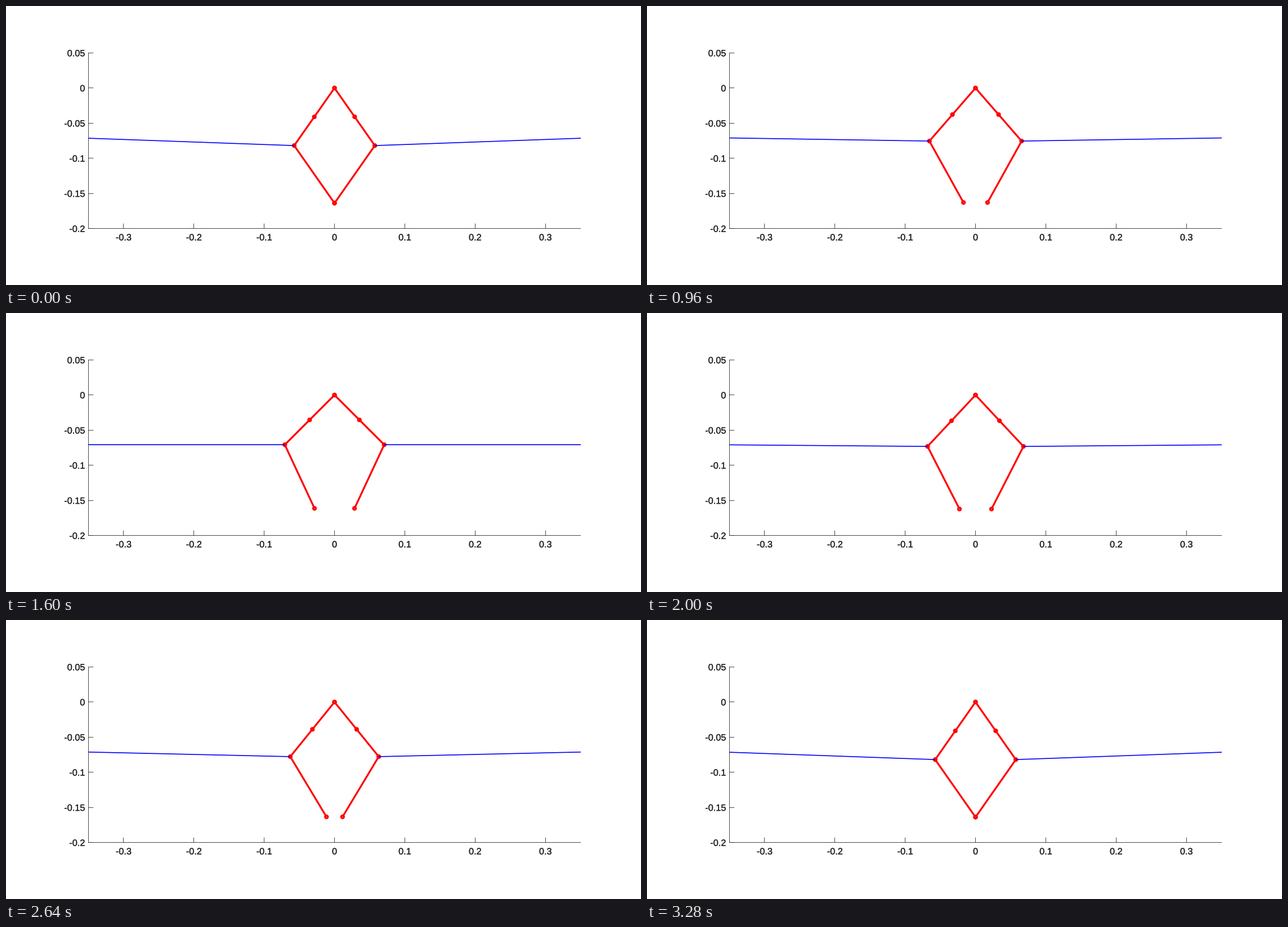
Animation of 1128 by 496 pixels, one loop 3360 ms. Source, as a matplotlib script:

```python
import numpy as np
import matplotlib.pyplot as plt
from matplotlib.animation import FuncAnimation
from matplotlib.lines import Line2D
from matplotlib.patches import Circle
from matplotlib.patheffects import withStroke

WIDTH, HEIGHT, DPI = 1128, 496, 100
PX = 72 / DPI                      # points per pixel
SCALE = 0.775 * WIDTH / 0.7        # pixels per data unit, both axes
ZERO_X, ZERO_Y = 583.55, 145.85    # stage position of the data origin
X_MIN, X_MAX, Y_MIN, Y_MAX = -0.35, 0.35, -0.2, 0.05
TICK = 8.74
INK = "#262626"

LINK = 0.1                         # length of every linkage bar
STEPS = 20
ANGLES = np.radians(np.linspace(35, 45, STEPS + 1))
ANCHOR_X = LINK * np.sin(np.pi / 4) + 0.3
ANCHOR_Y = -LINK * np.cos(np.pi / 4)

plt.rcParams.update({"font.family": "Liberation Sans", "text.hinting": "none",
                     "toolbar": "None"})


def stage_x(x):
    return ZERO_X + x * SCALE


def stage_y(y):
    return ZERO_Y - y * SCALE


fig = plt.figure(figsize=(WIDTH / DPI, HEIGHT / DPI), dpi=DPI, facecolor="white")
ax = fig.add_axes([stage_x(X_MIN) / WIDTH, 1 - stage_y(Y_MIN) / HEIGHT,
                   (X_MAX - X_MIN) * SCALE / WIDTH, (Y_MAX - Y_MIN) * SCALE / HEIGHT])
ax.set(xlim=(X_MIN, X_MAX), ylim=(Y_MIN, Y_MAX))
ax.axis("off")


def rule(x0, y0, x1, y1):
    """Thin axis line between two stage points."""
    fig.add_artist(Line2D([x0 / WIDTH, x1 / WIDTH], [1 - y0 / HEIGHT, 1 - y1 / HEIGHT],
                          transform=fig.transFigure, color=INK, lw=0.85 * PX,
                          solid_capstyle="butt", snap=False))


def label(value, x, baseline, ha):
    fig.text(x / WIDTH, 1 - baseline / HEIGHT, f"{value:g}", ha=ha, va="baseline",
             fontsize=16.3 * PX, color=INK,
             path_effects=[withStroke(linewidth=0.3 * PX, foreground=INK)])


def crisp(position):
    return np.floor(position) + 0.5


left, bottom = crisp(stage_x(X_MIN)), crisp(stage_y(Y_MIN))
rule(left, crisp(stage_y(Y_MAX)) - 0.5, left, bottom + 0.5)
rule(left - 0.5, bottom, crisp(stage_x(X_MAX)) + 0.5, bottom)
for tick in np.arange(-3, 4) / 10:
    x = crisp(stage_x(tick))
    rule(x, bottom, x, bottom - TICK)
    label(tick, stage_x(tick), 416.7, "center")
for tick in np.arange(-4, 2) / 20:
    y = crisp(stage_y(tick))
    rule(left, y, left + TICK, y)
    label(tick, 140.3, stage_y(tick) + 6, "right")


class Half:
    """One side of the linkage: wire, jointed bars and joint rings."""

    def __init__(self, sign):
        self.sign = sign
        self.bars, = ax.plot([], [], color="red", lw=3.25 * PX, zorder=2,
                             solid_joinstyle="round", solid_capstyle="butt")
        self.rings = [ax.add_patch(Circle((0, 0), 2.5 / SCALE, fill=False, ec="red",
                                          lw=3.25 * PX, zorder=3)) for _ in range(4)]
        self.wire, = ax.plot([], [], color="blue", lw=1.65 * PX, zorder=4,
                             solid_capstyle="butt", snap=False)

    def pose(self, upper):
        lower = np.radians(70) - upper
        elbow = LINK * np.array([np.sin(upper), -np.cos(upper)])
        tip = elbow - LINK * np.array([np.sin(lower), np.cos(lower)])
        joints = np.array([(0, 0), elbow / 2, elbow, tip]) * (self.sign, 1)
        self.bars.set_data(*joints.T)
        self.wire.set_data([joints[2, 0], self.sign * ANCHOR_X], [elbow[1], ANCHOR_Y])
        for ring, joint in zip(self.rings, joints):
            ring.center = joint


halves = [Half(-1), Half(1)]
FRAMES = 2 * (STEPS + 1)


def update(frame):
    step = min(frame, FRAMES - 1 - frame)
    for half in halves:
        half.pose(ANGLES[step])
    return []


anim = FuncAnimation(fig, update, frames=FRAMES, interval=80, repeat=True,
                     repeat_delay=0, blit=False)
plt.show()
```
